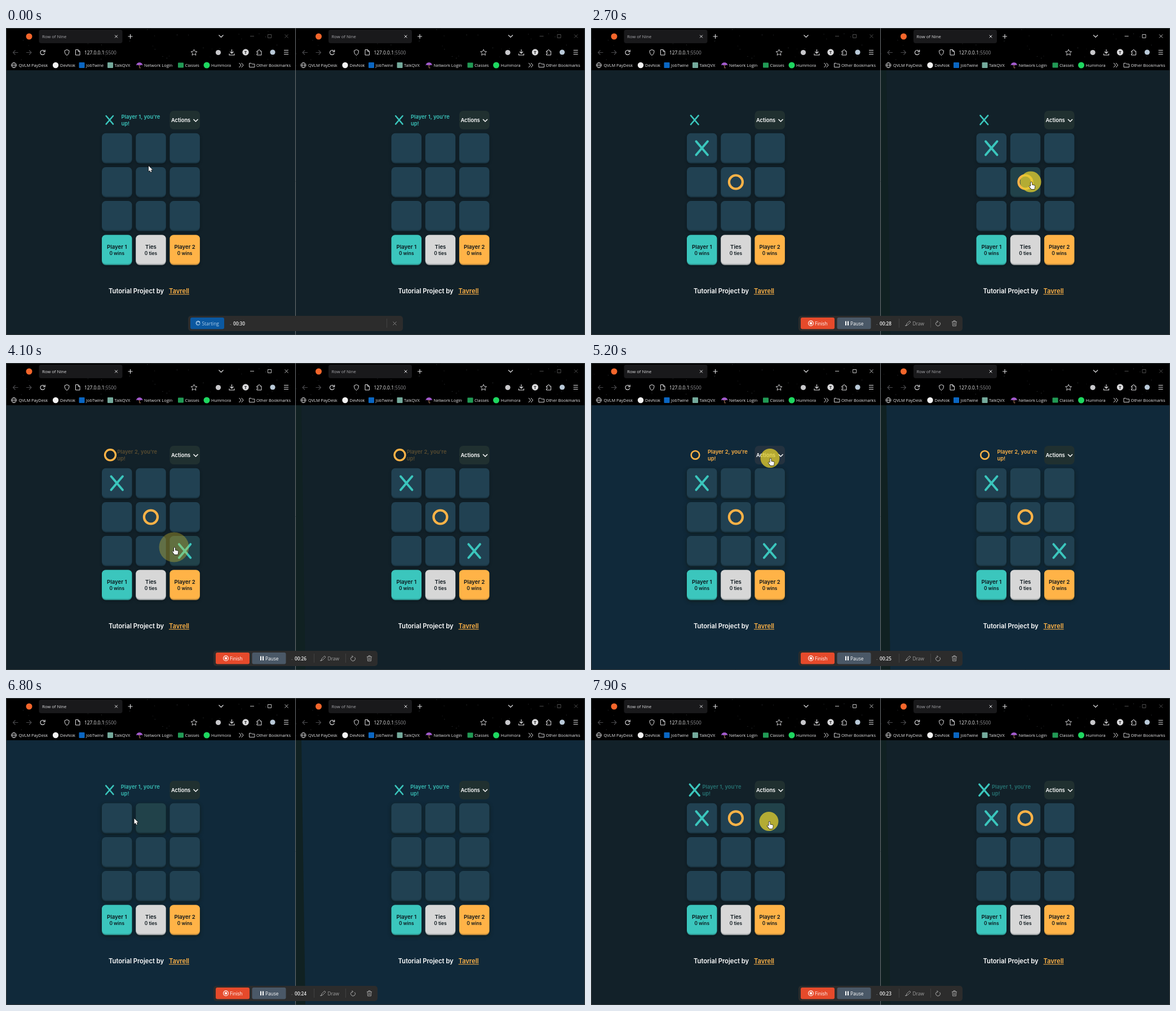
These frames come from a looping animation (1027 by 545 pixels, 8 s). An HTML page with a canvas:

```html
<!DOCTYPE html>
<html lang="en">
<head>
<meta charset="utf-8">
<title>Row of Nine</title>
<style>
html, body { margin: 0; width: 100%; height: 100%; overflow: hidden; background: #000; }
canvas { display: block; }
</style>
</head>
<body>
<canvas id="stage" width="1027" height="545"></canvas>
<script>
const ctx = document.getElementById('stage').getContext('2d');
const LOOP = 8000, PANE = 513.5, STATUS_MS = 800, HOVER_LAG = 120;
const UI = '"Open Sans", "Noto Sans", sans-serif';
const GAME = 'Inter, sans-serif';
const TEAL = '#3bc6bd', ORANGE = '#ffb347';
const TILE = 53.5, PITCH = 60.2;
const ACTIONS = [290.5, 147, 53.5, 33];

const moves = [
  { t: 880, cell: 0, mark: 'x' },
  { t: 2600, cell: 4, mark: 'o' },
  { t: 3800, cell: 8, mark: 'x' },
  { t: 6020, reset: true },
  { t: 6990, cell: 0, mark: 'x' },
  { t: 7460, cell: 1, mark: 'o' }
];
const turns = [[-1000, 1], [900, 2], [2640, 1], [3860, 2], [6040, 1], [7010, 2], [7500, 1]];
const clicks = [870, 2600, 3800, 5140, 6010, 6980, 7450, 7840];
const path = [
  [0, 253, 245], [300, 253, 245], [800, 200, 215], [1050, 200, 215],
  [1700, 516, 222], [1800, 516, 222], [2500, 780, 273], [2800, 780, 273],
  [3700, 298, 327], [4200, 298, 327], [5050, 317.5, 169], [5300, 317.5, 169],
  [5900, 310, 205], [6100, 310, 205], [6800, 227.5, 214], [6960, 200, 214],
  [7080, 200, 214], [7400, 256, 214], [7520, 256, 214], [7800, 315.5, 219], [8000, 315.5, 219]
];

let seed = 7;
const random = () => (seed = (seed * 16807) % 2147483647) / 2147483647;
const stars = Array.from({ length: 46 }, () => ({
  x: random() * 511, y: 2 + random() * 70, a: 0.12 + random() * 0.22
}));

function fillBox(x, y, w, h, color, r = 0) {
  ctx.fillStyle = color;
  ctx.beginPath();
  ctx.roundRect(x, y, w, h, r);
  ctx.fill();
}
function disc(x, y, r, color) {
  ctx.fillStyle = color;
  ctx.beginPath();
  ctx.arc(x, y, r, 0, Math.PI * 2);
  ctx.fill();
}
function ring(x, y, r, color, width, from = 0, to = Math.PI * 2) {
  ctx.strokeStyle = color;
  ctx.lineWidth = width;
  ctx.beginPath();
  ctx.arc(x, y, r, from, to);
  ctx.stroke();
}
function stroke(d, color, width = 1) {
  ctx.strokeStyle = color;
  ctx.lineWidth = width;
  ctx.stroke(new Path2D(d));
}
function text(str, x, y, size, color, { font = UI, weight = 400, align = 'left' } = {}) {
  ctx.font = `${weight} ${size}px ${font}`;
  ctx.textAlign = align;
  ctx.textBaseline = 'alphabetic';
  ctx.fillStyle = color;
  ctx.fillText(str, x, y);
  return ctx.measureText(str).width;
}
const gameText = (str, x, y, size, color, align) =>
  text(str, x, y, size, color, { font: GAME, weight: 600, align });
const cross = (x, y, r, color, width = 1) =>
  stroke(`M${x - r} ${y - r}l${2 * r} ${2 * r}m0 ${-2 * r}l${-2 * r} ${2 * r}`, color, width);
const inside = (p, [x, y, w, h]) =>
  p.x >= x && p.x <= x + w && p.y >= y && p.y <= y + h;
const tileRect = (col, row) => [170 + col * PITCH, 186.7 + row * PITCH, TILE, TILE];
const cellRect = i => tileRect(i % 3, Math.floor(i / 3));

function cursorAt(t) {
  const i = Math.max(1, path.findIndex(p => p[0] > t));
  const [t0, x0, y0] = path[i - 1], [t1, x1, y1] = path[i];
  const u = (t - t0) / (t1 - t0), e = u * u * (3 - 2 * u);
  return { x: x0 + (x1 - x0) * e, y: y0 + (y1 - y0) * e };
}
function boardAt(t) {
  let board = Array(9).fill('');
  for (const m of moves) {
    if (m.t > t) break;
    if (m.reset) board = Array(9).fill('');
    else board[m.cell] = m.mark;
  }
  return board;
}
function statusAt(t) {
  const [start, player] = turns.filter(s => s[0] <= t).pop();
  return { player, p: Math.min(1, (t - start) / STATUS_MS) };
}

function drawMark(mark, x, y, scale) {
  ctx.save();
  ctx.translate(x, y);
  ctx.scale(scale, scale);
  ctx.lineCap = 'round';
  if (mark === 'x') stroke('M-10.2-12L10.2 12M10.2-12L-10.2 12', TEAL, 4);
  else ring(0, 0, 12, ORANGE, 4.2);
  ctx.restore();
}

function drawToolbar(active) {
  const ink = '#e4e4e6', dim = '#4a4a4d';
  const controls = active ? '#d4d4d4' : '#555';
  fillBox(58.5, 3, 148, 24, '#19191b', 4);
  disc(41, 15, 5.5, '#f4662b');
  text('Row of Nine', 64, 18, 7.7, active ? '#dedee0' : '#aaaaae');
  cross(195.5, 15, 2.4, ink);
  stroke('M216.5 15h8m-4-4v8M377.5 12.5l4 4 4-4', ink, 1.1);
  stroke('M433 14.5h7M464.5 11.5h6v6h-6z', controls, 0.9);
  cross(497.5, 14.5, 3, controls, 0.9);

  stroke('M21.5 43.5h-9m4-4l-4 4 4 4M36 43.5h9m-4-4l4 4-4 4', dim, 1.1);
  ring(65, 43.5, 4, ink, 1.2, 0.3, 5.5);
  stroke('M69.2 38.8v3.4h-3.4', ink, 1.2);
  stroke('M108 38.5l4 1.7c0 4-1 6.5-4 8.3-3-1.8-4-4.3-4-8.3z', ink);
  stroke('M123.5 38.5h4.5l3 3v6.5h-7.5zM128 38.5v3h3', ink);
  const hostWidth = text('127.0.0.1', 139, 46.7, 8.4, '#eee');
  text(':5500', 139 + hostWidth, 46.7, 8.4, '#929296');
  stroke('M333.5 38l1.6 3.5 3.8.4-2.8 2.6.8 3.8-3.4-1.9-3.4 1.9.8-3.8-2.8-2.6 3.8-.4z', ink, 0.9);
  disc(376.5, 43.5, 4.6, '#c9c9cc');
  stroke('M400.5 38v7m-3-3l3 3 3-3M396 45.5v2.5h9v-2.5', ink, 1.1);
  disc(425, 43, 5.7, '#dadadc');
  text('T', 425, 45.8, 7.5, '#222', { weight: 700, align: 'center' });
  stroke('M445 41h2.5c-.8-3.6 3.8-3.6 3 0h2.5v7h-8v-2.3c3 .6 3-3 0-2.4z', ink);
  disc(473, 43, 4.6, '#b9c9d8');
  stroke('M493 39.5h8m-8 3.5h8m-8 3.5h8', ink, 1.1);

  ring(14, 66, 4.5, ink, 0.9);
  stroke('M9.5 66h9M14 61.5c-3 2.5-3 6.5 0 9c3-2.5 3-6.5 0-9', ink, 0.8);
  disc(88, 66, 5.2, '#f2f2f2');
  fillBox(129.5, 61, 10, 10, '#0a66c2', 1);
  fillBox(180, 61, 10, 10, '#74aa9c', 1);
  ctx.fillStyle = '#a45bd0';
  ctx.fill(new Path2D('M231 66.5c.5-7 11-7 11.500 0l-2-1.200-1.800 1.200-2-1.200-1.900 1.200-1.900-1.200z'));
  stroke('M236.700 65v5c0 1.500 2 1.500 2 0', '#b98565', 1);
  fillBox(305, 61.5, 10, 9, '#219a55', 1);
  disc(356, 66, 5.5, '#1ed760');
  const bookmarks = [
    ['QVLM PayDesk', 22.5], ['DevNok', 96], ['JobTwine', 142], ['TalkQVX', 192.5],
    ['Network Login', 245], ['Classes', 317.5], ['Hummora', 364], ['Other Bookmarks', 444]
  ];
  for (const [label, x] of bookmarks) text(label, x, 68.8, 7.4, ink);
  stroke('M413.5 62l3.5 4-3.5 4m4-8l3.5 4-3.5 4', ink);
  stroke('M431.5 62.5h3.5l1.5 1.5h4.5v5.5h-9.5z', ink, 0.9);
}

function drawTile(rect, color, blue) {
  const [x, y, w, h] = rect;
  ctx.save();
  ctx.shadowColor = blue ? 'rgba(16,28,26,.95)' : 'rgba(9,20,24,.65)';
  ctx.shadowBlur = blue ? 6 : 4;
  ctx.shadowOffsetY = 2;
  fillBox(x, y, w, h, color, 7);
  ctx.restore();
  ctx.save();
  ctx.beginPath();
  ctx.roundRect(x, y, w, h, 7);
  ctx.clip();
  ctx.beginPath();
  ctx.rect(x, y, w, h);
  ctx.roundRect(x, y - 4, w, h + 2, 7);
  ctx.fillStyle = 'rgba(10,24,32,.26)';
  ctx.fill('evenodd');
  ctx.restore();
}

function drawStatus({ player, p }) {
  const scale = 0.61 * (1 + 0.37 * Math.sin(Math.PI * p));
  drawMark(player === 1 ? 'x' : 'o', player === 1 ? 183.8 : 185, 163.3, scale);
  const x = (player === 1 ? 204.5 : 207) - 14 * (1 - p);
  const color = player === 1 ? TEAL : ORANGE;
  ctx.globalAlpha = p < 0.12 ? 0 : p;
  gameText(`Player ${player}, you're`, x, 161.3, 9.4, color);
  gameText('up!', x, 172.5, 9.4, color);
  ctx.globalAlpha = 1;
}

function drawPane(offset, { board, status, blue, strip, active, hover }) {
  const local = { x: hover.x - offset, y: hover.y };
  ctx.save();
  ctx.translate(offset, 0);
  fillBox(0, 0, 514, 75, '#000');
  for (const s of stars) fillBox(s.x, s.y, 1, 1, `rgba(210,220,230,${s.a})`);
  drawToolbar(active);
  fillBox(0, 75, 514, 470, blue ? '#10293a' : '#122129');
  if (strip && offset) {
    ctx.fillStyle = '#102122';
    ctx.fill(new Path2D('M0 75H10.5L17.5 545H0z'));
  }

  drawStatus(status);
  fillBox(...ACTIONS, inside(local, ACTIONS) ? '#24323f' : '#203030', 7);
  gameText('Actions', 293, 166.8, 9.3, '#fff');
  stroke('M332.5 162l4 4 4-4', '#fff', 1.5);

  board.forEach((mark, i) => {
    const rect = cellRect(i);
    drawTile(rect, inside(local, rect) ? '#21424a' : '#214152', blue);
    if (mark) drawMark(mark, rect[0] + 26.7, rect[1] + 26.6, 1);
  });
  const scores = [['Player 1', '0 wins', TEAL], ['Ties', '0 ties', '#d7d7d7'], ['Player 2', '0 wins', ORANGE]];
  scores.forEach(([name, score, color], i) => {
    const rect = tileRect(i, 3), middle = rect[0] + TILE / 2;
    drawTile(rect, color, blue);
    gameText(name, middle, 391.6, 9.6, '#0c161c', 'center');
    gameText(score, middle, 403, 8.4, '#0c161c', 'center');
  });
  gameText('Tutorial Project by', 182, 470.8, 11.2, '#fff');
  const linkWidth = gameText('Tavrell', 289, 470.8, 11.2, ORANGE);
  fillBox(289, 472.3, linkWidth, 1, ORANGE);
  ctx.restore();
}

function drawRecorder(t, starting) {
  const clock = `00:${30 - Math.floor(t / 1000)}`;
  const clockStyle = { weight: 600 };
  if (starting) {
    fillBox(323, 511, 381, 27, '#2c2c2c', 5);
    fillBox(327, 514, 60, 20.5, '#0b58a0', 3);
    for (let i = 0; i < 8; i++) {
      const a = (i + Math.floor(t / 100)) * Math.PI / 4;
      disc(340.7 + 3.2 * Math.cos(a), 524 + 3.2 * Math.sin(a), 1.2, `rgba(200,228,250,${0.4 + i * 0.08})`);
    }
    text('Starting', 347.5, 527.5, 8.4, '#a9cbe8');
    text('-', 397, 527.5, 8, '#aaa');
    text(clock, 403, 527.8, 8.2, '#f0f0f0', clockStyle);
    stroke('M675.5 516v16', '#414141');
    cross(689.5, 524.5, 3, '#888');
    return;
  }
  fillBox(368, 511, 291, 27, '#2c2c2c', 5);
  fillBox(372, 514, 60, 20.5, '#e64a2b', 3);
  ring(390, 524.3, 4.4, '#fff', 1.1);
  fillBox(388, 522.3, 4, 4, '#fff', 0.5);
  text('Finish', 397, 527.5, 8.3, '#fff');
  fillBox(436.5, 514, 60, 20.5, '#4a5867', 3);
  fillBox(451, 520.5, 2, 7.5, '#fff');
  fillBox(455, 520.5, 2, 7.5, '#fff');
  text('Pause', 460, 527.5, 8.3, '#fff');
  text('-', 506, 527.5, 8, '#888');
  text(clock, 512, 527.8, 8.2, '#f0f0f0', clockStyle);
  stroke('M546.5 516v16M602.5 516v16', '#414141');
  stroke('M559 528l1-3 5-5 2 2-5 5zM557 528.5h3', '#999', 1);
  text('Draw', 570.5, 527.5, 8.3, '#a0a0a0');
  ring(615.5, 525, 4, '#aaa', 1, -0.7, 4.4);
  stroke('M613.5 519.5l2.3 1.7-2.3 1.8', '#aaa');
  stroke('M640 521.5h9m-6 0v-2h3v2m-5 0l.6 7.5h5.8l.6-7.5m-4.5 2v4m2-4v4', '#aaa', 0.9);
}

function drawClicks(t) {
  for (const start of clicks) {
    const age = t - start;
    const alpha = Math.min(0.76, 0.8 - (age - 100) / 430);
    if (age < 0 || alpha <= 0) continue;
    const { x, y } = cursorAt(start);
    disc(x, y, 14.5 + 12 * Math.min(1, age / 300), `rgba(225,205,45,${alpha})`);
  }
}

function drawPointer(p) {
  ctx.save();
  ctx.translate(p.x, p.y);
  ctx.lineJoin = 'round';
  const local = { x: p.x > PANE ? p.x - PANE : p.x, y: p.y };
  const overButton = inside(local, ACTIONS) || Array.from({ length: 9 }, (_, i) => cellRect(i)).some(r => inside(local, r));
  if (Math.abs(p.x - 515) < 5) {
    const arrows = 'M-5 0h10M-3-2l-2 2 2 2M3-2l2 2-2 2';
    stroke(arrows, '#000', 3);
    stroke(arrows, '#fff', 1.1);
  } else {
    const shape = overButton
      ? 'M0 1.5c0-1.5 2-1.5 2 0v4l4.5 1c1 .4 1 1 .8 2l-.8 4.5h-5.5l-3.5-4.5c-.6-1 .7-1.7 1.5-.9l1 1z'
      : 'M0 0v9.5l2.2-2 1.5 3.4 1.7-.8-1.5-3.3h3.1z';
    stroke(shape, '#111', 1.4);
    ctx.fillStyle = '#fff';
    ctx.fill(new Path2D(shape));
  }
  ctx.restore();
}

function render(t) {
  const starting = t < 400;
  const status = statusAt(t);
  const rightActive = t >= 2580 && t < 3780;
  const shared = {
    board: boardAt(t),
    status,
    hover: cursorAt(Math.max(0, t - HOVER_LAG)),
    strip: !starting,
    blue: !starting && status.p >= 0.94
  };
  drawPane(0, { ...shared, active: t >= 860 && !rightActive });
  drawPane(PANE, { ...shared, active: rightActive });
  stroke('M0 .5H1027M.5 0V545M0 544.5H1027M1026.5 0V545', '#343a3c');
  stroke('M513.5 0V545', '#6b7072');
  drawRecorder(t, starting);
  drawClicks(t);
  drawPointer(cursorAt(t));
}

const began = performance.now();
function tick() {
  render((performance.now() - began) % LOOP);
  requestAnimationFrame(tick);
}
tick();
</script>
</body>
</html>
```
